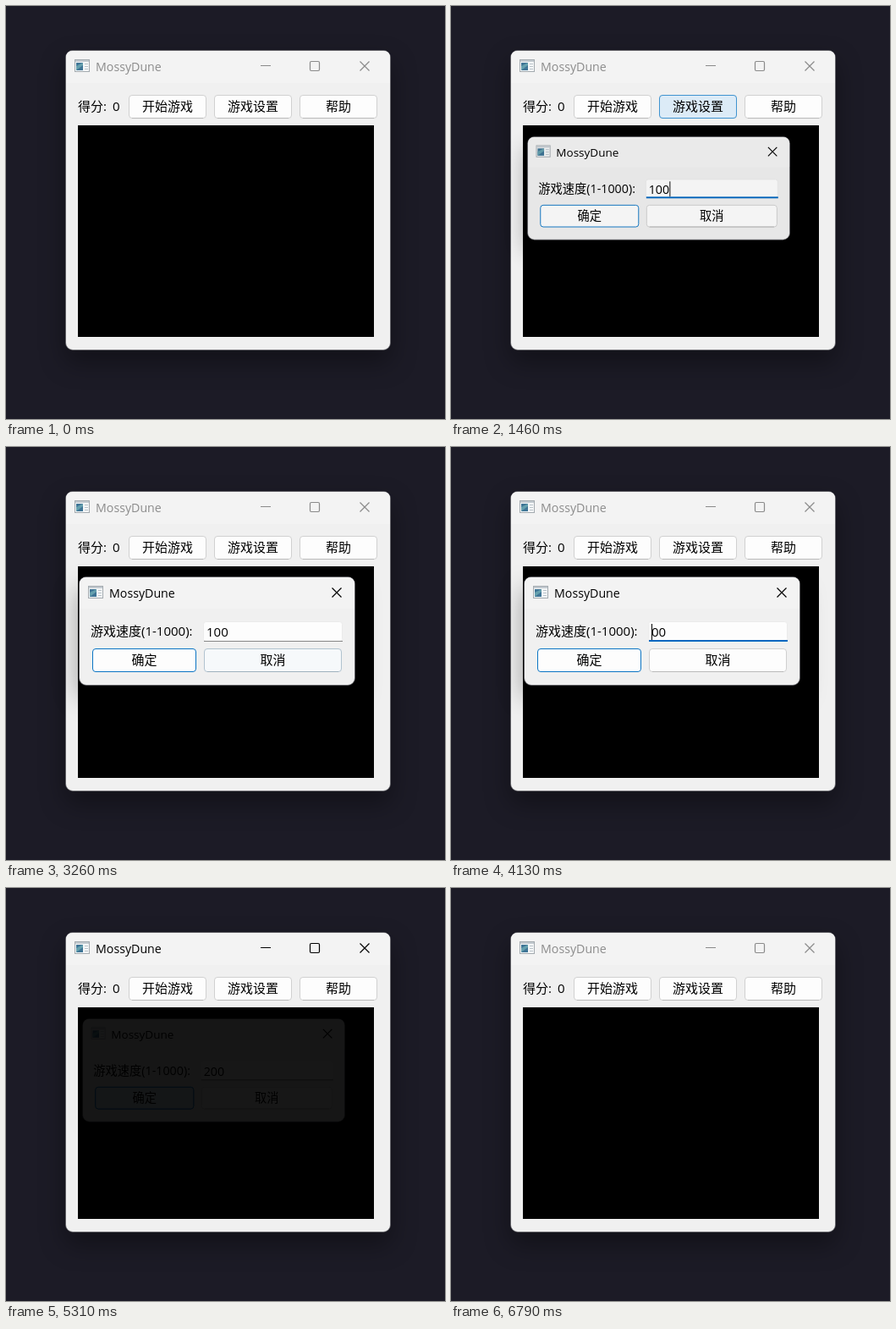
An HTML page that plays this animation: 519x488 px, repeating every 6860 ms.

```html
<!DOCTYPE html>
<html lang="zh">
<head>
<meta charset="utf-8">
<title>MossyDune</title>
<style>
html, body { margin: 0; width: 100%; height: 100%; overflow: hidden; background: #1c1b26; }
svg { display: block; }
text { font: 15px "Open Sans", "Noto Sans CJK SC", "Noto Sans CJK", sans-serif; fill: #000; }
.title { font-size: 14.2px; }
.mid { text-anchor: middle; }
.frame { fill: #f0f0f0; stroke: #56565c; stroke-opacity: .7; filter: drop-shadow(0 14px 15px rgba(0, 0, 0, .36)); }
.face { fill: #fdfdfd; stroke: #d0d0d0; }
.hover { fill: #dcebf7; stroke: #3f93d0; opacity: 0; }
.edge { stroke: #b9b9b9; }
.default .face, .default .hover { stroke: #0a74c4; }
.default .edge { display: none; }
.glyph { fill: none; stroke-width: 1.2; }
</style>
</head>
<body>
<svg id="stage" width="519" height="488" viewBox="0 0 519 488">
  <defs>
    <g id="appIcon">
      <rect x=".5" y=".5" width="17" height="14" fill="#f4f6f7" stroke="#a4abb0"/>
      <path d="M1 2h16" stroke="#c3cad0" stroke-width="2"/>
      <rect x="2" y="4" width="8" height="9" fill="#3f7596"/>
      <path d="M2 13V8l8-4v3z" fill="#65a0ae"/>
      <path d="M12 5.5h4M12 8.5h4M12 11.5h4" stroke="#b9c2c9"/>
    </g>
  </defs>

  <rect class="frame" x="70.5" y="52.5" width="384" height="354" rx="8.5"/>
  <path d="M71 91V61q0-8 8-8h367q8 0 8 8v30z" fill="#f3f3f3"/>
  <use href="#appIcon" x="81" y="63"/>
  <text class="title" id="mainTitle" x="106" y="77">MossyDune</text>
  <g class="glyph" id="controls">
    <path d="M301 70.5h12M418.500 65.500l11 11m0-11l-11 11"/>
    <rect x="359.500" y="65.500" width="11" height="11" rx="1.500"/>
  </g>
  <text x="85" y="124">得分:</text>
  <text x="126" y="124">0</text>
  <g id="mainButtons"></g>
  <rect x="85" y="141" width="350" height="250"/>

  <g id="dialog">
    <rect class="frame" x="86.500" y="153.500" width="326" height="128" rx="8.5"/>
    <path d="M87 191v-29q0-8 8-8h309q8 0 8 8v29z" fill="#f3f3f3"/>
    <use href="#appIcon" x="97" y="164"/>
    <text class="title" x="122" y="178">MossyDune</text>
    <path class="glyph" d="M385.500 166.500l11 11m0-11l-11 11" stroke="#000"/>
    <text x="100" y="223">游戏速度(1-1000):</text>
    <rect x="233.500" y="206.500" width="164" height="23" rx="3" fill="#fdfdfd" stroke="#ebebeb"/>
    <text id="value" x="237" y="224"></text>
    <rect id="caret" y="209" width="1" height="19"/>
    <rect id="underline" x="234" width="164"/>
    <g id="dialogButtons"></g>
  </g>
</svg>
<script>
const LOOP = 6860;
const el = id => document.getElementById(id);

// Adds a push button and returns its hover layer.
function addButton(parent, label, x, y, w, h, kind = '') {
  const box = `x="${x + .5}" y="${y + .5}" width="${w - 1}" height="${h - 1}" rx="3.5"`;
  parent.insertAdjacentHTML('beforeend', `<g class="${kind}">
    <rect class="face" ${box}/>
    <path class="edge" d="M${x + 4} ${y + h - .5}h${w - 8}"/>
    <rect class="hover" ${box}/>
    <text class="mid" x="${x + w / 2}" y="${y + 19}">${label}</text></g>`);
  return parent.lastElementChild.querySelector('.hover');
}

addButton(el('mainButtons'), '开始游戏', 145, 105, 92, 28);
const settings = addButton(el('mainButtons'), '游戏设置', 246, 105, 92, 28);
addButton(el('mainButtons'), '帮助', 347, 105, 92, 28);
const confirm = addButton(el('dialogButtons'), '确定', 102, 238, 123, 28, 'default');
const cancel = addButton(el('dialogButtons'), '取消', 234, 238, 163, 28);

// Latest value whose start time has passed.
const stepAt = (t, steps) => steps.reduce((value, [start, next]) => t >= start ? next : value, null);
const within = (t, from, to) => t >= from && t < to;
const ramp = (t, from, to) => Math.min(1, Math.max(0, (t - from) / (to - from)));

const dialogPose = [ // time, [opacity, scale]
  [0, [0, .95]], [1390, [.4, .92]], [1460, [.965, .951]], [1520, [1, .99]],
  [1540, [1, 1]], [5310, [.09, .951]], [5330, [0, .951]]
];
const caretX = [ // 0 hides the caret
  [0, 263], [1920, 0], [2400, 263], [2930, 0], [3470, 246],
  [4000, 0], [4130, 237], [4330, 246], [4860, 0]
];
const typed = [[0, '100'], [4130, '00'], [4330, '200']];

function draw(t) {
  const active = within(t, 1180, 1390) || within(t, 5140, 6790);
  el('mainTitle').style.fill = active ? '#000' : '#8c8c8c';
  el('controls').style.stroke = active ? '#000' : '#8a8a8a';
  settings.style.opacity = t < 1700 ? ramp(t, 960, 1150) : 0;

  const [opacity, scale] = stepAt(t, dialogPose);
  el('dialog').style.opacity = opacity;
  el('dialog').setAttribute('transform', `translate(169 174) scale(${scale}) translate(-169 -174)`);

  const focused = t < 3260 || within(t, 3470, 5000);
  const underline = el('underline');
  underline.setAttribute('y', focused ? 228 : 229);
  underline.setAttribute('height', focused ? 2 : 1);
  underline.style.fill = focused ? '#0067c0' : '#868686';

  const x = stepAt(t, caretX);
  el('caret').setAttribute('x', x);
  el('caret').style.opacity = focused && x ? 1 : 0;
  el('value').textContent = stepAt(t, typed);

  cancel.style.opacity = t < 3260 ? 0 : Math.min(ramp(t, 3225, 3400), 1 - ramp(t, 3430, 3600));
  confirm.style.opacity = ramp(t, 4640, 4800);
}

const begin = performance.now();
function tick() {
  draw((performance.now() - begin) % LOOP);
  requestAnimationFrame(tick);
}
tick();
</script>
</body>
</html>
```
